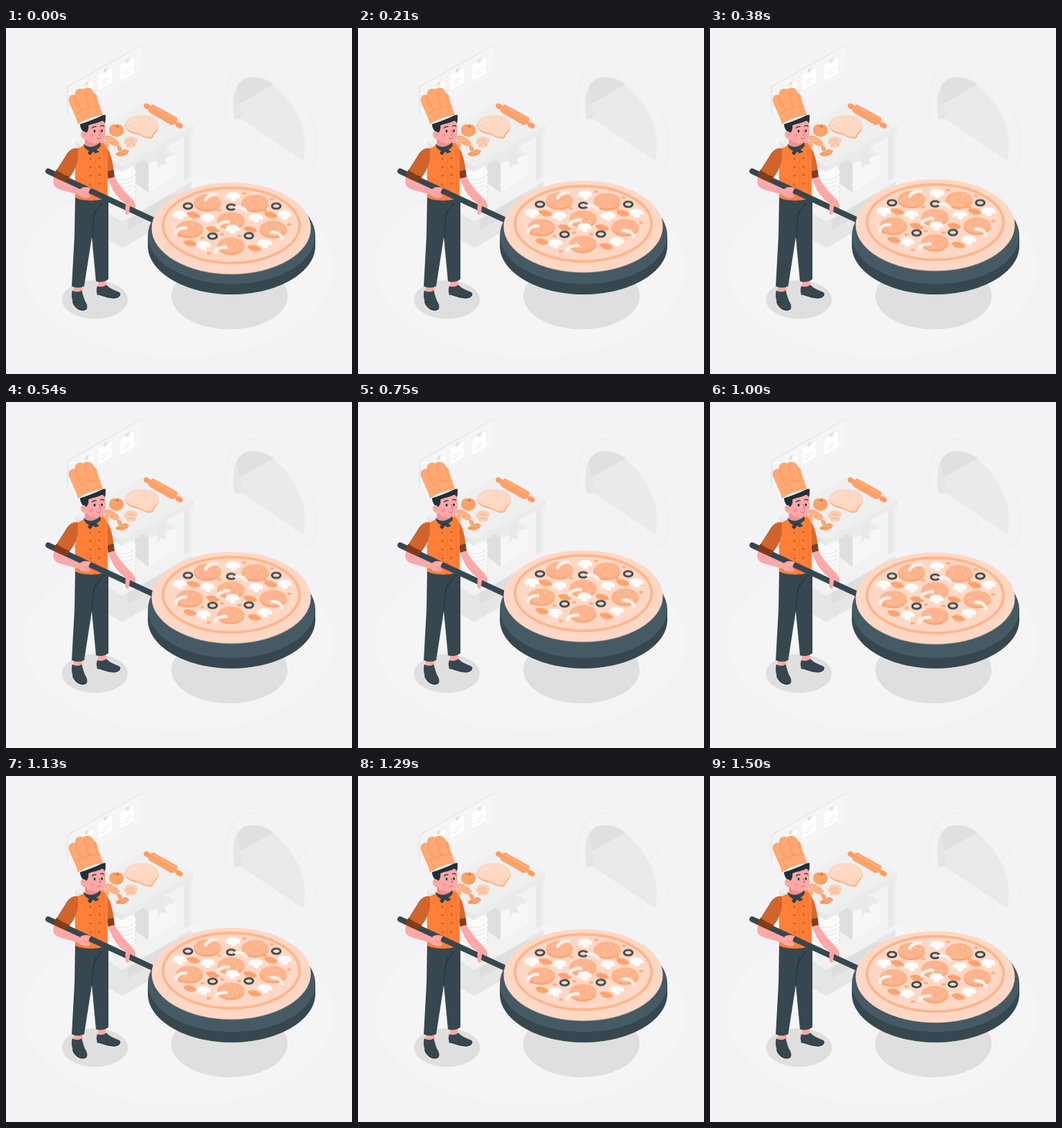
Write an HTML page that moves like this. It is 500 px wide and 500 px high and loops after 1.54 s.

```html
<!DOCTYPE html>
<html lang="en">
<head>
<meta charset="utf-8">
<title>Pizza chef</title>
<style>
html, body { margin: 0; width: 100%; height: 100%; overflow: hidden; background: #f3f3f5; }
svg { display: block; width: 100vw; height: 100vh; }
.pizza { animation: hover 1540ms linear -40ms infinite; }
@keyframes hover {
  0%, 100% { transform: translateY(0); }
  50% { transform: translateY(-10px); }
}
.line { fill: none; stroke-linecap: round; stroke-linejoin: round; }
</style>
</head>
<body>
<svg viewBox="0 0 500 500" xmlns="http://www.w3.org/2000/svg">
<defs>
  <g id="salami">
    <ellipse cy="1" rx="19.500" ry="12" fill="#ff9d68"/>
    <ellipse cy="-.7" rx="19.500" ry="11.500" fill="#ffb48c"/>
    <g fill="#ffd9c4">
      <circle cx="-10" cy="-3" r=".9"/><circle cx="-3" cy="5" r="1"/><circle cx="5" cy="-6" r=".9"/>
      <circle cx="9" cy="3" r="1"/><circle cx="2" cy="7.500" r=".8"/><circle cx="-7" cy="3.500" r=".8"/>
      <circle cx="13" cy="-2" r=".8"/>
    </g>
  </g>
  <g id="shroom">
    <path d="M-10 0C-10-4-5-7 0-6C5-7 10-4 10.500 0C10 3 7 3 4.500 1.500C5 4 6 6 2 6.500C-3 7-4 5-3.500 2C-6 4-10 3-10 0Z" fill="#fff"/>
    <path class="line" d="M-3.500 2C-1 0 2 0 4.500 1.500" stroke="#ffe6d9" stroke-width=".8"/>
  </g>
  <g id="leaf">
    <path d="M-10-3C-4-7 6-5 10 2C3 7-7 5-10-3Z" fill="#ffa672"/>
    <path class="line" d="M-9-2.500Q0-1 8 2" stroke="#ff935a" stroke-width=".8"/>
  </g>
  <g id="olive">
    <ellipse rx="6.200" ry="3.900" fill="none" stroke="#37474f" stroke-width="2.900"/>
    <path class="line" d="M-6-1.500Q0-7 6-1.500" stroke="#52666f" stroke-width=".7"/>
  </g>
  <g id="note">
    <path d="M0 11L20.500 0V23.500L0 35Z" fill="#fff" stroke="#ededed" stroke-width=".5"/>
    <path d="M8 4L13 1.300V7.500L10.500 7L8 10.500Z" fill="#e2e2e2"/>
    <path class="line" d="M5 22L16 16M5 26.500L13 22" stroke="#e6e6e6"/>
  </g>
</defs>

<rect width="500" height="500" fill="#f3f3f5"/>
<ellipse cx="249.500" cy="346" rx="224.500" ry="130" fill="#f5f5f5"/>

<g id="board">
  <path d="M89 84L196 24V66L89 126Z" fill="#f5f5f5"/>
  <path d="M88 84.500L195 24.500L196 25.500L90 85.500V126H88Z" fill="#e8e8e8"/>
  <use href="#note" x="106" y="76"/>
  <use href="#note" x="133" y="56"/>
  <use href="#note" x="165" y="42"/>
</g>

<g id="oven">
  <path class="line" d="M319 139C312 92 320 54 356 54C402 56 447 112 449 164C449 186 445 201 438 210Z" stroke="#ebebec" stroke-width=".9"/>
  <path class="line" d="M316 108L328 108M317 89L330 92M323 71L335 80M337 58L344 73M357 54V71M379 60L373 74M400 73L390 84M418 91L406 100M433 113L419 121M444 139L428 145M449 166L432 168M447 189L431 184M430 192L438 210M319 139L332 131M345 140V154M365 152V166M386 165V179M408 179V192" stroke="#ececed" stroke-width=".8"/>
  <path d="M331 132C324 93 334 71 356 71C392 72 432 126 432 167L430 192L341 132Z" fill="#eaeaea"/>
  <path d="M330 128C325 92 335 71 356 71C368 71 378 75 387 81L338 109Z" fill="#e0e0e0"/>
  <path d="M331 132C327 112 328 94 334 85C336 99 337 114 342 127Z" fill="#e5e5e5"/>
</g>

<g id="counter">
  <path d="M100 175L203 120L266 150V226L168 285L100 246Z" fill="#f1f1f1"/>
  <path d="M203 116L258 150V217L203 190Z" fill="#f3f3f3"/>
  <path d="M100 240L203 181L268 222L168 280Z" fill="#f2f2f2"/>
  <path d="M100 240L168 280V318L100 279Z" fill="#e6e6e6"/>
  <path d="M168 280L268 222V260L168 318Z" fill="#e6e6e6"/>
  <path d="M176 277L238 241L264 239L214 271L176 292Z" fill="#dedede"/>
  <path d="M257 154L266 149V216L257 221Z" fill="#e9e9e9"/>
  <path d="M266 149L270 147V214L266 216Z" fill="#f0f0f0"/>
  <path d="M186 180L224 168L246 183L206 196Z" fill="#ebebeb"/>
  <path d="M186 180L206 196V238L186 223Z" fill="#dfdfdf"/>
  <path d="M206 196L246 183V213L206 238Z" fill="#f7f7f7"/>
  <path d="M218 178L229 174L231 198L225 197L219 203Z" fill="#e9e9e9"/>
  <g fill="#fafafa" stroke="#e2e2e2" stroke-width=".9">
    <ellipse cx="168" cy="244" rx="20" ry="11"/><ellipse cx="168" cy="238" rx="20" ry="11"/>
    <ellipse cx="168" cy="232" rx="20" ry="11"/><ellipse cx="168" cy="226" rx="20" ry="11"/>
    <ellipse cx="168" cy="220" rx="20" ry="11"/><ellipse cx="168" cy="214" rx="20" ry="11"/>
    <ellipse cx="168" cy="208" rx="20" ry="11"/>
  </g>
  <path d="M100 165L203 106L271 141L168 200Z" fill="#efefef"/>
  <path d="M100 165L168 200V208L100 173Z" fill="#e6e6e6"/>
  <path d="M168 200L271 141V149L168 208Z" fill="#ebebeb"/>
</g>

<g id="food">
  <path class="line" d="M203 112.500L252 141.500" stroke="#ff9a60" stroke-width="4"/>
  <path class="line" d="M202.500 112.500L206 114.500M249 140L252 141.500" stroke="#ff9a60" stroke-width="7"/>
  <path d="M213 110.500C207 112 204 119 207 122L238 140C244 142 250 133 247 129.500Z" fill="#ffa26a"/>
  <path class="line" d="M213 114L244 132" stroke="#ffb185" stroke-width="2"/>
  <path d="M172 143C169 132 185 125 199 126C213 127 224 136 220 146C217 153 213 153 213 158C207 163 198 158 193 155C185 153 175 152 172 143Z" fill="#ffb78c"/>
  <path d="M172 141C169 131 185 125 199 126C213 127 223 135 220 144C217 150 212 150 211 156C206 160 199 156 194 153C186 150 175 150 172 141Z" fill="#ffd8c4"/>
  <path class="line" d="M177 139C181 134 186 132 190 132" stroke="#ffe8dc" stroke-width="1.500"/>
  <path d="M149 148C149 140 156 138 160 140C166 138 171 143 170 149C169 155 164 158 158 157C152 156 149 153 149 148Z" fill="#ffa26a"/>
  <path d="M155 141.500L159 142L161 138.500L162 142L166 142.500L161 144Z" fill="#e87532"/>
  <g fill="#ffb48a" stroke="#ff965b" stroke-width=".8">
    <ellipse cx="156" cy="165" rx="7.500" ry="4.500" transform="rotate(25 156 165)"/>
    <ellipse cx="150" cy="161" rx="7.500" ry="4.500" transform="rotate(25 150 161)"/>
    <ellipse cx="143" cy="168" rx="6" ry="4" transform="rotate(25 143 168)"/>
  </g>
  <path d="M171 163C172 157 181 155 185 158C191 159 192 165 187 167C190 171 184 174 180 172C176 174 171 172 174 168C170 168 170 165 171 163Z" fill="#ffcdb2"/>
  <path class="line" d="M174 164Q180 160 186 164M176 169Q181 166 186 169" stroke="#ffa473" stroke-width=".8"/>
  <path d="M161 169C166 171 168 174 168 177C171 174 175 175 178 178C175 185 166 187 159 184C158 181 161 179 164 179C161 176 160 172 161 169Z" fill="#ff9b61"/>
  <path class="line" d="M163 172L167 180L175 179" stroke="#ffc09c" stroke-width=".8"/>
</g>

<g fill="#dfdfdf">
  <ellipse cx="128.500" cy="392.500" rx="47.500" ry="28"/>
  <ellipse cx="323" cy="387" rx="84" ry="48.500"/>
</g>

<g id="chef">
  <path d="M98 370H110L111 382H98ZM133 360H145L144 375H133Z" fill="#ffa8a7"/>
  <path d="M96 379C94 384 95 391 97 397C100 405 107 410 114 408C119 406 118 400 114 394C112 389 111 384 109 379C106 382 100 382 96 379Z" fill="#37474f"/>
  <path class="line" d="M96.500 396C100 405 108 410 116 406" stroke="#263640" stroke-width="1.200"/>
  <path d="M132 373C130 378 131 382 132 385C139 386 146 391 157 390.500C163 390 167 386 164 382C157 379 149 376 145 371C142 374 136 375 132 373Z" fill="#37474f"/>
  <path class="line" d="M132 385C141 386 147 390.500 157 390C162 389.500 165 387 164.800 384" stroke="#263640" stroke-width="1.200"/>

  <path d="M100 242C114 250 134 250 148 243L148 363C143 367 136 368 130 366L124 302L113 373C108 376 100 376 95 373L99 300Z" fill="#37474f"/>
  <path class="line" d="M138 254C132 261 127 270 126 278L124.500 302M129 262L126.500 274" stroke="#263640" stroke-width="1.200"/>

  <path d="M141 169C151 175 154 193 156 208L147 213L143 195Z" fill="#d9682d"/>
  <path d="M146.500 207L155.500 205L157 215C154 218 151 219 147.500 218Z" fill="#803d1b"/>
  <path d="M102 175C109 171 116 168 122 169L138 165C143 167 147 173 147 180V244C136 251 112 251 100 245C100 220 99 195 102 175Z" fill="#ff7f38"/>
  <path class="line" d="M128 181C130 202 130 228 129 249M139 168C143 190 143 218 142 247" stroke="#ee722c" stroke-width=".8"/>
  <g fill="#c85a22">
    <circle cx="122" cy="189" r="1.500"/><circle cx="135" cy="188" r="1.500"/>
    <circle cx="122" cy="201" r="1.500"/><circle cx="135" cy="200" r="1.500"/>
    <circle cx="122" cy="213" r="1.500"/><circle cx="135" cy="212" r="1.500"/>
    <circle cx="122" cy="226" r="1.500"/><circle cx="135" cy="225" r="1.500"/>
  </g>

  <path d="M114 158H133V171C127 175 119 175 114 169Z" fill="#f28f8f"/>
  <path d="M111 140C110 150 112 160 121 165C130 169 140 169 143 159C145 150 144 142 142 134C132 130 118 133 111 140Z" fill="#ffa8a7"/>
  <path d="M107 139C116 136 130 131 140 126L144 125.500C143.500 128 144.500 131 143 138C142 136 141 134.500 139 134C132 138 124 138 119 141C120 146 118 149 116 152L113 152C110 148 107 144 107 139Z" fill="#22313a"/>
  <path d="M117 153C113 146 107 149 108 155C109 160 114 162 118 160Z" fill="#ffa8a7"/>
  <path class="line" d="M110.500 153Q114 153 115 157" stroke="#e58484" stroke-width=".8"/>
  <path class="line" d="M124.500 144.500Q127 142 130 142.500M136.500 141.500Q139 140 141.500 142" stroke="#22313a" stroke-width="1.300"/>
  <ellipse cx="128" cy="149" rx="1.500" ry="1.900" fill="#22313a"/>
  <ellipse cx="138.500" cy="148.500" rx="1.400" ry="1.900" fill="#22313a"/>
  <path class="line" d="M134.500 148L137 154L134.500 154.500M131 159Q134 161 137 159" stroke="#d85f64" stroke-width=".9"/>
  <circle cx="124" cy="156" r="2.500" fill="#ff9593"/>

  <path d="M104 139.500C102 130 95 117 91 107C89 100 94 95 100 97C98 89 107 85 112 89C114 84 126 86 127 94C131 95 132 98 132 102C134 110 138 118 140 126C130 127 114 132 104 139.500Z" fill="#ffa873"/>
  <path class="line" d="M99 97L109 120M112 89L120 115M126 94L132 111M101 124C111 117 124 113 136 113" stroke="#f98f52" stroke-width=".9"/>

  <path d="M112 167C117 173 127 174 136 165L137 170C133 176 127 178 121 178C116 176 112 172 112 167Z" fill="#37474f"/>
  <path d="M122 174L128 174L135 179L129 181L126 178.500L122 184L118 181Z" fill="#2f4049"/>

  <path d="M70 214C66 225 69 231 80 234L112 243L117 231L90 220Z" fill="#ffa8a7"/>
  <path d="M148 217.500L157 215C163 227 172 237 181 246C186 251 189 257 186 262L176 260L173 254C162 247 152 233 148 217.500Z" fill="#ffa8a7"/>
  <path class="line" d="M61 207L216 279" stroke="#37474f" stroke-width="8"/>
  <path d="M108 232C112 229 119 229 123 232C120 234 119 237 120 240C123 242 122 246 117 246C110 246 104 242 102 238Z" fill="#ffa8a7"/>
  <path class="line" d="M112 238L120 241" stroke="#ec8585" stroke-width=".8"/>
  <path d="M173 251C177 248 182 251 180 255C178 260 179 266 177 269C174 271 172 268 172.500 264Z" fill="#ffa8a7"/>
  <path d="M104 174C95 172 89 179 86 185L72 207L91 217C99 208 103 197 104 188Z" fill="#d0642c"/>
  <path d="M73 205C70 208 69 211 69 214C75 219 83 222 89 221L92 215C85 213 78 209 73 205Z" fill="#803d1b"/>
</g>

<g id="pan">
  <path d="M205 300V315C205 353 259 385 326 385S447 353 447 315V300Z" fill="#37474f"/>
  <ellipse cx="326" cy="300" rx="121" ry="70" fill="#455a64"/>
</g>

<g class="pizza">
  <ellipse cx="325.500" cy="290.200" rx="115" ry="66.300" fill="#ffd8c5"/>
  <ellipse cx="325.500" cy="286" rx="98.700" ry="54.300" fill="none" stroke="#ffb48a" stroke-width="3.800"/>
  <g fill="#ffaa7a">
    <ellipse cx="344" cy="239.500" rx="3" ry="1.800"/><ellipse cx="308" cy="264" rx="3" ry="1.800"/>
    <ellipse cx="384" cy="248" rx="3" ry="1.800"/><ellipse cx="409" cy="284.500" rx="3" ry="1.800"/>
    <ellipse cx="284" cy="304" rx="3" ry="1.800"/><ellipse cx="293" cy="326" rx="3" ry="1.800"/>
    <ellipse cx="312" cy="299" rx="3" ry="1.800"/><ellipse cx="337" cy="301" rx="3" ry="1.800"/>
    <ellipse cx="251" cy="301" rx="3" ry="1.800"/><ellipse cx="375" cy="265" rx="3" ry="1.800"/>
  </g>
  <use href="#salami" x="291" y="253"/><use href="#salami" x="360" y="254"/>
  <use href="#salami" x="265" y="291.500"/><use href="#salami" x="325" y="279"/>
  <use href="#salami" x="386" y="291.500"/><use href="#salami" x="325" y="315.500"/>
  <use href="#leaf" x="271" y="271"/><use href="#leaf" x="383" y="271"/>
  <use href="#leaf" x="266" y="312"/><use href="#leaf" x="299" y="292"/>
  <use href="#leaf" x="353" y="292"/><use href="#leaf" x="359" y="319"/>
  <use href="#olive" x="263" y="258"/><use href="#olive" x="325.500" y="259.500"/>
  <use href="#olive" x="390.500" y="258"/><use href="#olive" x="298.500" y="301.500"/>
  <use href="#olive" x="351" y="301"/>
  <g class="line" stroke="#fff3ec" stroke-width="4.600">
    <path d="M288.500 249C290 244 297 241 304 241"/>
    <path d="M332 260C338 259 345 261 347 266"/>
    <path d="M306 289C307 283 314 280 322 280.500"/>
    <path d="M245.500 298C246 292 253 289 260 289.500"/>
    <path d="M383 296C391 295 398 299 398.500 305"/>
    <path d="M302.500 325C303 320 310 317 318 317.500"/>
  </g>
  <use href="#shroom" x="328" y="244.500"/><use href="#shroom" x="291" y="275.500"/>
  <use href="#shroom" x="361" y="275.500"/><use href="#shroom" x="402" y="271"/>
  <use href="#shroom" x="251" y="271"/><use href="#shroom" x="327" y="291.500"/>
  <use href="#shroom" x="285" y="315"/><use href="#shroom" x="374" y="312"/>
</g>
</svg>
</body>
</html>
```
